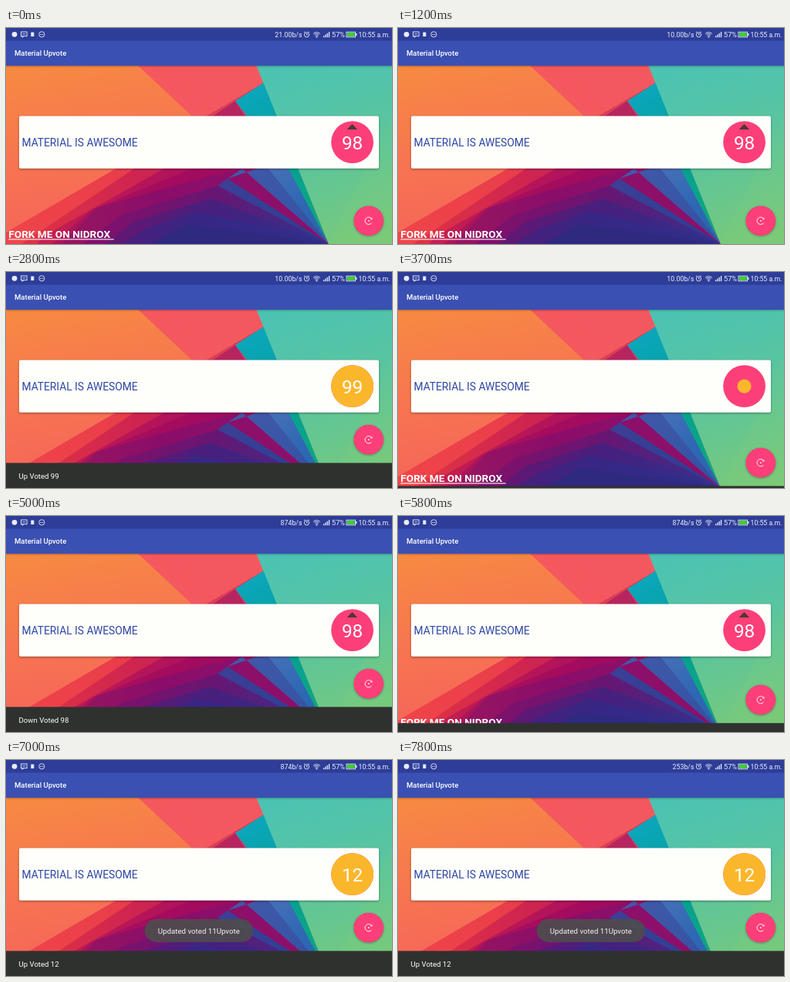
Write an HTML page with a canvas that moves like this. It is 500 px wide and 281 px high and loops after 8 s.

```html
<!DOCTYPE html>
<html lang="en">
<head>
<meta charset="utf-8">
<title>Material Upvote</title>
<style>
  html, body { margin: 0; width: 100%; height: 100%; overflow: hidden; background: #3a50b2; }
  canvas { display: block; width: 100vw; height: 100vh; }
</style>
</head>
<body>
<canvas id="stage"></canvas>
<script>
const W = 500, H = 281, LOOP = 8000;
const PINK = '#fd3f79', AMBER = '#fbb72c', NAVY = '#2c47a3';
const canvas = document.getElementById('stage');
const ctx = canvas.getContext('2d');

const clamp = v => Math.max(0, Math.min(1, v));
const ramp = (t, a, b) => clamp((t - a) / (b - a));
const smooth = p => p * p * (3 - 2 * p);

const votes = [
  { at: 2200, from: 98, to: 99, up: true },
  { at: 3500, from: 99, to: 98, up: false },
  { at: 6400, from: 98, to: 12, up: true }
];
const snacks = [
  { text: 'Up Voted 99', show: [2241, 2491], hide: [3420, 3760] },
  { text: 'Down Voted 98', show: [3770, 4000], hide: [5580, 5950] },
  { text: 'Up Voted 12', show: [6441, 6691], hide: [9000, 9300] }
];
const taps = [
  { from: 1980, to: 2130, x: 448, y: 150, alpha: 0.6 },
  { from: 3190, to: 3330, x: 448, y: 150, alpha: 0.6 },
  { from: 6190, to: 6540, x: 475, y: 255, alpha: 0.35 }
];
const speeds = [[7200, '253b/s'], [4200, '874b/s'], [1200, '10.00b/s'], [0, '21.00b/s']];

function gradient(x0, y0, x1, y1, ...colors) {
  const g = ctx.createLinearGradient(x0, y0, x1, y1);
  colors.forEach((c, i) => g.addColorStop(i / (colors.length - 1), c));
  return g;
}

function poly(fill, ...p) {
  ctx.beginPath();
  for (let i = 0; i < p.length; i += 2) ctx.lineTo(p[i], p[i + 1]);
  ctx.closePath();
  ctx.fillStyle = fill;
  ctx.fill();
}

// a wallpaper sheet: every one ends in the same lower right point
const sheet = (fill, ...p) => poly(fill, ...p, 418, 281);

function disc(x, y, r, fill) {
  ctx.beginPath();
  ctx.arc(x, y, r, 0, Math.PI * 2);
  ctx.fillStyle = fill;
  ctx.fill();
}

function ring(x, y, r, from = 0, to = Math.PI * 2) {
  ctx.beginPath();
  ctx.arc(x, y, r, from, to);
  ctx.stroke();
}

function line(...p) {
  ctx.beginPath();
  for (let i = 0; i < p.length; i += 2) ctx.lineTo(p[i], p[i + 1]);
  ctx.stroke();
}

function rect(x, y, w, h, fill) {
  ctx.fillStyle = fill;
  ctx.fillRect(x, y, w, h);
}

function roundRect(x, y, w, h, r, fill) {
  ctx.beginPath();
  ctx.roundRect(x, y, w, h, r);
  ctx.fillStyle = fill;
  ctx.fill();
}

function label(text, x, y, size, color, weight = 400, align = 'left') {
  ctx.font = `${weight} ${size}px Roboto, sans-serif`;
  ctx.textAlign = align;
  ctx.fillStyle = color;
  ctx.fillText(text, x, y);
}

function withShadow(blur, dy, alpha, draw) {
  const k = canvas.width / W;
  ctx.save();
  ctx.shadowColor = `rgba(0,0,0,${alpha})`;
  ctx.shadowBlur = blur * k;
  ctx.shadowOffsetY = dy * k;
  draw();
  ctx.restore();
}

function drawWallpaper() {
  rect(0, 48, W, H - 48, gradient(0, 50, 40, 281, '#f78a42', '#f77650', '#f5645a'));
  // warm sheets fanning out of the lower left
  sheet(gradient(230, 50, 60, 260, '#f4585f', '#f3595c', '#f4625c'),
    170, 48, 324, 48, 334, 71, 418, 281, 0, 281);
  sheet(gradient(330, 75, 10, 270, '#d23f5c', '#e83c4a', '#f0444a'),
    334, 71, 0, 266, 0, 281);
  sheet(gradient(297, 95, 30, 275, '#b52560', '#cf2450', '#de3344'),
    297, 95, 20, 281);
  sheet(gradient(300, 114, 50, 275, '#a8125e', '#b5145a', '#c41f50'),
    312, 114, 205, 183, 50, 270, 40, 281);
  sheet(gradient(300, 150, 80, 270, '#a00a60', '#a50c5e', '#ad1659'),
    312, 145, 240, 183, 110, 237, 60, 281);
  sheet(gradient(300, 185, 100, 260, '#8c0f6a', '#8a0d69', '#951462'),
    306, 183, 265, 192, 117, 234, 72, 281);
  // violet layers along the bottom
  sheet(gradient(130, 260, 400, 275, '#7d116c', '#681672', '#34308c'),
    278, 204, 150, 243, 100, 281);
  sheet(gradient(150, 260, 400, 275, '#5f1874', '#46207e', '#30308c'),
    265, 222, 165, 252, 130, 281);
  sheet(gradient(160, 265, 400, 278, '#46207c', '#352886', '#2e2e88'),
    248, 238, 180, 262, 150, 281);
  sheet('#2e2a7f', 235, 255, 190, 281);
  // cool sheets meeting at the lower right
  sheet(gradient(310, 80, 410, 281, '#0ba6bd', '#06a193', '#10a878'),
    334, 71, 297, 95, 365, 183);
  sheet(gradient(345, 183, 410, 275, '#4470b6', '#2f68b4', '#2767ae'),
    325, 183, 366, 183);
  sheet(gradient(300, 185, 400, 275, '#4059a8', '#3a56a6', '#3450a0'),
    306, 183, 287, 196, 325, 183, 340, 183);
  sheet(gradient(280, 200, 400, 275, '#3c3f96', '#333f94', '#313a92'),
    287, 196, 274, 205);
  poly(gradient(380, 50, 450, 281, '#4cc3b2', '#5cc59c', '#78c97a'),
    324, 48, 500, 48, 500, 281, 418, 281);
  poly(gradient(400, 100, 490, 281, 'rgba(110,205,150,0)', 'rgba(125,203,115,.5)'),
    500, 110, 500, 281, 418, 281);
}

function drawStatusIcons() {
  const ink = '#e8ebf8';
  ctx.strokeStyle = ink;
  ctx.lineWidth = 0.9;
  disc(11, 8.3, 3.4, ink);
  ctx.strokeRect(19.5, 5, 7.6, 5.6);
  line(21, 10.6, 21, 12.4, 23, 10.6);
  rect(21.3, 7.4, 4, 0.9, ink);
  rect(32.3, 5.6, 4, 5.4, ink);
  ring(46.3, 8.3, 3.6);
  for (const x of [44.7, 46.3, 47.9]) disc(x, 8.3, 0.6, ink);

  ring(389.5, 8.8, 3.1);
  line(389.5, 6.8, 389.5, 8.9, 391, 8.9);
  line(386, 6, 387.6, 4.7);
  line(393, 6, 391.4, 4.7);

  for (const r of [2.4, 4.3, 6.2]) ring(402.5, 11.8, r, -Math.PI * 0.76, -Math.PI * 0.24);
  disc(402.5, 11.4, 1, ink);
  for (let i = 0; i < 4; i++) rect(411 + i * 2.3, 10.2 - i * 1.7, 1.3, 2 + i * 1.7, ink);

  ctx.strokeRect(441, 5.2, 11.6, 6.6);
  rect(453, 7, 1.4, 3, ink);
  rect(442, 6.1, 9.6, 4.8, '#3fd12c');
}

function drawBars(t) {
  withShadow(2, 0.6, 0.3, () => rect(0, 0, W, 49, '#3a50b2'));
  rect(0, 0, W, 16.5, '#2d3d98');
  drawStatusIcons();
  const ink = '#eef0fa';
  label(speeds.find(s => t >= s[0])[1], 383.5, 11.6, 8.8, ink, 400, 'right');
  label('57%', 422, 11.6, 9.2, ink);
  label('10:55 a.m.', 456.6, 11.6, 8.7, ink);
  label('Material Upvote', 11, 36.4, 9.5, '#fff', 500);
}

function drawNumber(value, dy, alpha) {
  ctx.save();
  ctx.beginPath();
  ctx.rect(421, 130, 55, 38);
  ctx.clip();
  ctx.globalAlpha = alpha;
  label(value, 448.6, 158 + dy, 24.4, '#fff', 400, 'center');
  ctx.restore();
}

function drawVote(t) {
  const vote = votes.filter(v => t >= v.at - 60).pop() ||
    { at: -LOOP, from: 98, to: 98, up: false };
  const s = t - vote.at;
  const grow = ramp(s, 0, 300);
  const out = ramp(s, -60, 200);
  const enter = ramp(s, 250, 500);
  const arrow = vote.up ? 1 - ramp(s, -60, 40) : ramp(s, 300, 480);

  disc(448.6, 148.6, 27.4, PINK);
  const r = 27.4 * (vote.up ? grow : 1 - grow);
  if (r > 0) disc(448.6, 148.6, r, AMBER);
  if (arrow > 0) {
    ctx.globalAlpha = arrow;
    poly('#4b3a33', 441.6, 132, 448.4, 125, 455.2, 132);
    ctx.globalAlpha = 1;
  }
  if (out < 1) drawNumber(vote.from, -30 * out, 1 - out);
  if (enter > 0) drawNumber(vote.to, 24 * (1 - smooth(enter)), enter);
}

function drawCard(t) {
  withShadow(3, 0.9, 0.4, () => roundRect(17, 114.5, 466, 68.3, 2, '#fefefb'));
  label('MATERIAL IS AWESOME', 20.5, 153.8, 13.8, NAVY);
  drawVote(t);
}

function drawLink() {
  label('FORK ME ON NIDROX', 3.3, 273.2, 13.6, '#fff', 700);
  rect(3.3, 274.4, 136.5, 1.1, '#fff');
}

function drawFab(lift) {
  const x = 469.8, y = 250.8 - lift;
  withShadow(3, 0.8, 0.3, () => disc(x, y, 19.4, PINK));
  ctx.strokeStyle = '#fff';
  ctx.lineWidth = 0.9;
  ring(x, y, 4.7, Math.PI * 0.22, Math.PI * 1.78);
  poly('#fff', x + 4.6, y - 4.4, x + 4.6, y - 1.6, x + 2, y - 1.8);
  disc(x, y, 0.9, '#fff');
}

function drawSnack(snack, lift, t) {
  if (lift <= 0) return;
  const y = H - lift;
  rect(0, y, W, 33, '#2f312f');
  const [a, b] = snack.show, [c, d] = snack.hide;
  ctx.globalAlpha = ramp(t, a + 70, b) * (1 - ramp(t, c, d - 70));
  label(snack.text, 16.5, y + 20.3, 9.6, '#fff');
  ctx.globalAlpha = 1;
}

function drawToast(t) {
  const alpha = smooth(ramp(t, 6420, 6850));
  if (alpha <= 0) return;
  ctx.globalAlpha = alpha;
  roundRect(179.5, 207, 140.5, 30, 15, 'rgba(78,76,78,.93)');
  label('Updated voted 11Upvote', 249.8, 225.8, 9.7, '#f4f4f4', 400, 'center');
  ctx.globalAlpha = 1;
}

function drawTaps(t) {
  for (const tap of taps) {
    if (t < tap.from || t > tap.to) continue;
    ctx.globalAlpha = tap.alpha;
    disc(tap.x, tap.y, 6.5, '#e6dde2');
    ctx.globalAlpha = 1;
  }
}

function draw(t) {
  const k = window.devicePixelRatio || 1;
  const w = Math.round(innerWidth * k), h = Math.round(innerHeight * k);
  if (canvas.width !== w || canvas.height !== h) {
    canvas.width = w;
    canvas.height = h;
  }
  ctx.setTransform(w / W, 0, 0, h / H, 0, 0);

  const snack = snacks.filter(s => t >= s.show[0]).pop();
  const lift = snack
    ? 32.6 * smooth(ramp(t, ...snack.show)) * (1 - smooth(ramp(t, ...snack.hide)))
    : 0;

  drawWallpaper();
  drawBars(t);
  drawCard(t);
  drawLink();
  drawFab(lift);
  drawSnack(snack, lift, t);
  drawToast(t);
  drawTaps(t);
}

const start = performance.now();
function tick() {
  draw((performance.now() - start) % LOOP);
  requestAnimationFrame(tick);
}
tick();
</script>
</body>
</html>
```
